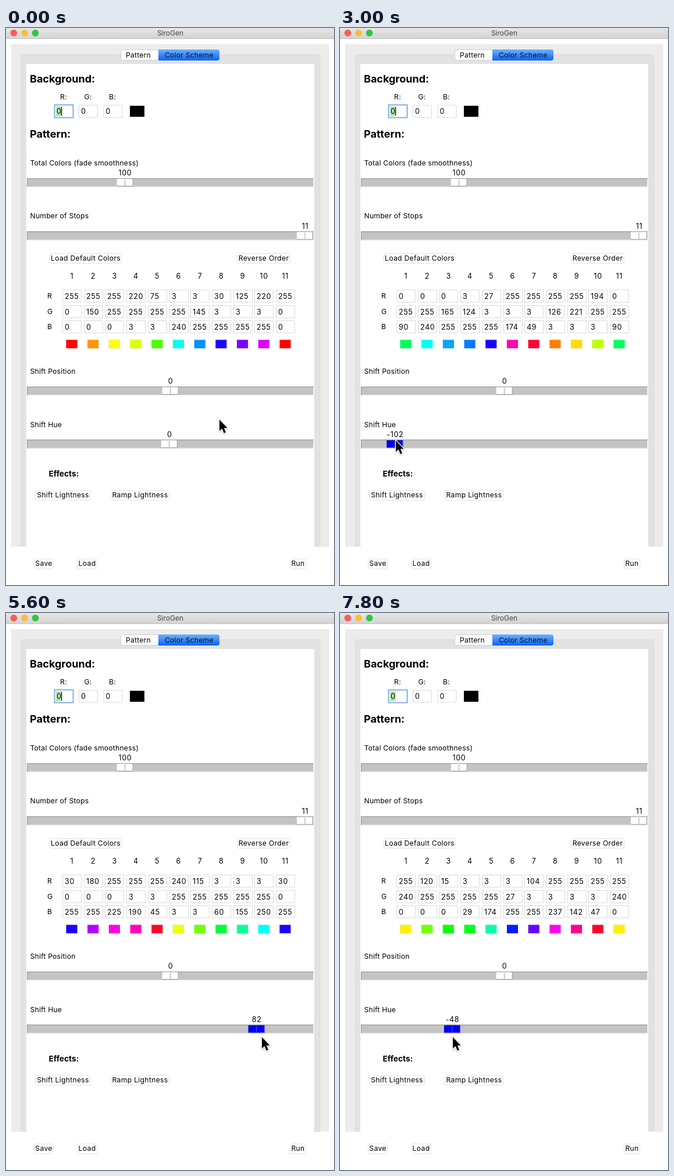
An HTML page with a canvas for the animation above (8000 ms loop, 564x960 px).

```html
<!DOCTYPE html>
<html lang="en">
<head>
<meta charset="utf-8">
<title>SiroGen</title>
<style>
  html, body { margin: 0; width: 100%; height: 100%; overflow: hidden; background: #fff; }
  canvas { display: block; width: 564px; height: 960px; }
</style>
</head>
<body>
<canvas id="stage" width="564" height="960"></canvas>
<script>
const ctx = document.getElementById('stage').getContext('2d');
const LOOP = 8000, STEP = 200, GRAB = 1000;
const FONT = 'Inter, "Open Sans", sans-serif';

// time, pointer x, pointer y, slider value, applied value, drift of the narrow-range colours
const KEYS = [
  [0, 367, 675, 0, 0, 0],
  [400, 346, 688, 0, 0, 0],
  [1000, 283, 715, 0, 0, 0],
  [1200, 273, 716, 0, 0, 0],
  [1600, 238, 714, -16, -12, 0],
  [2200, 152, 711, -70, -66, 0],
  [3000, 96, 711, -102, -100, 0],
  [3400, 90, 712, -104, -104, 2],
  [4000, 170, 716, -62, -66, 3],
  [4600, 289, 719, -6, -8, 4],
  [5600, 440, 731, 82, 80, 6],
  [6100, 470, 736, 102, 101, 6],
  [6800, 398, 739, 68, 70, 6],
  [7800, 194, 731, -48, -40, 3]
];

// Hue positions of the stops; the outer ones span 0-255, the others 3-255.
const STOPS = [0, 150, 255, 287, 432, 741, 866, 1035, 1130, 1225, 0];
const stopX = i => 113 + 36.7 * i;

const clamp = (v, lo, hi) => Math.max(lo, Math.min(hi, v));

function slope(i, c) {
  if (i === 0 || i === KEYS.length - 1) return 0;
  const [a, b, d] = [KEYS[i - 1], KEYS[i], KEYS[i + 1]];
  const m = (b[c] - a[c]) / (b[0] - a[0]), n = (d[c] - b[c]) / (d[0] - b[0]);
  return m * n > 0 ? 2 * m * n / (m + n) : 0;
}

// Monotone cubic through one column of the keys.
function track(t, c) {
  let i = 0;
  while (i < KEYS.length - 2 && t >= KEYS[i + 1][0]) i++;
  const a = KEYS[i], b = KEYS[i + 1], h = b[0] - a[0];
  const u = clamp((t - a[0]) / h, 0, 1), v = 1 - u;
  return a[c] * v * v * (1 + 2 * u) + b[c] * u * u * (3 - 2 * u)
    + h * u * v * (v * slope(i, c) - u * slope(i + 1, c));
}

function stopColor(i, shift, drift) {
  const lo = i > 2 && i < 10 ? 3 : 0, d = 255 - lo, wheel = 6 * d;
  const raw = STOPS[i] + shift + (lo ? drift : 0);
  const p = (raw % wheel + wheel) % wheel;
  return [
    Math.abs(p - 3 * d) - d,
    2 * d - Math.abs(p - 2 * d),
    2 * d - Math.abs(p - 4 * d)
  ].map(v => lo + clamp(v, 0, d));
}

function rect(x, y, w, h, fill) {
  ctx.fillStyle = fill;
  ctx.fillRect(x, y, w, h);
}

function frame(x, y, w, h, color, r = 0, fill = '#fff', line = 1) {
  ctx.beginPath();
  ctx.roundRect(x + .5, y + .5, w - 1, h - 1, r);
  ctx.fillStyle = fill;
  ctx.fill();
  ctx.strokeStyle = color;
  ctx.lineWidth = line;
  ctx.stroke();
}

function text(s, x, y, { size = 12.2, weight = 400, align = 'left', gap = .2, color = '#000' } = {}) {
  ctx.font = `${weight} ${size}px ${FONT}`;
  ctx.letterSpacing = gap + 'px';
  ctx.textAlign = align;
  ctx.fillStyle = color;
  ctx.fillText(s, x, y);
}

const number = (s, x, y, align = 'center') => text(s, x, y, { size: 12.6, gap: .6, align });
const heading = (s, x, y, size = 18) => text(s, x, y, { size, weight: 700, gap: 0 });

function button(s, x, y, w) {
  frame(x, y + 1, w, 18, '#e2e2e2', 3);
  text(s, x + w / 2, y + 13.5, { align: 'center', gap: .3 });
}

function field(s, x, y) {
  frame(x, y, 33, 22, '#d9d9d9');
  number(s, x + 4, y + 15.7, 'left');
}

function slider(y, x, value, active) {
  rect(36, y, 493, 15, '#c3c3c3');
  rect(36, y, 493, 1, '#929292');
  rect(36, y, 1, 15, '#929292');
  rect(37, y + 14, 492, 1, '#e4e4e4');
  rect(528, y + 1, 1, 14, '#e4e4e4');
  const l = x - 14;
  rect(l, y + 1, 28, 13, active ? '#0000a8' : '#8e8e8e');
  rect(l + 1, y + 2, 26, 11, active ? '#0000f2' : '#fff');
  if (!active) rect(l, y + 1, 27, 12, '#fff');
  rect(x - .5, y + 2, 1, 11, active ? '#5555ff' : '#a0a0a0');
  if (active) {
    rect(l + 1, y + 13, 27, 1, '#5050ff');
    rect(l + 27, y + 2, 1, 12, '#5050ff');
  }
  number(value, x + .5, y - 4.7);
}

function windowChrome() {
  rect(0, 0, 564, 960, '#fff');
  const bar = ctx.createLinearGradient(0, 0, 0, 18);
  bar.addColorStop(0, '#e6e6e6');
  bar.addColorStop(1, '#d3d3d3');
  rect(0, 0, 564, 18, bar);
  rect(0, 18, 564, 1, '#c4c4c4');
  ['#fc5b55', '#fdbc37', '#2fc641'].forEach((color, i) => {
    ctx.beginPath();
    ctx.arc(13.3 + 18.6 * i, 8.6, 5.8, 0, 7);
    ctx.fillStyle = color;
    ctx.fill();
  });
  text('SiroGen', 282.5, 13.2, { size: 12, gap: 0, align: 'center', color: '#444' });

  rect(9, 28, 547, 866, '#ececec');
  ctx.beginPath();
  ctx.roundRect(26, 46, 514, 848, [4, 4, 0, 0]);
  ctx.fillStyle = '#e2e2e2';
  ctx.fill();
  ctx.strokeStyle = '#dadada';
  ctx.lineWidth = 1;
  ctx.stroke();
  rect(35, 62, 495, 832, '#fff');
  rect(0, 894, 564, 66, '#fff');
}

function tabs() {
  frame(197, 37, 70, 19, '#cfcfcf', 4);
  const blue = ctx.createLinearGradient(0, 37, 0, 56);
  blue.addColorStop(0, '#6eb2fa');
  blue.addColorStop(1, '#0a63f4');
  ctx.beginPath();
  ctx.roundRect(262, 37, 105, 19, [0, 4, 4, 0]);
  ctx.fillStyle = blue;
  ctx.fill();
  text('Pattern', 206, 51.2);
  text('Color Scheme', 273, 51.2, { color: '#041030' });
}

function background(t) {
  heading('Background:', 41, 94.3);
  ['R:', 'G:', 'B:'].forEach((s, i) => text(s, 99 + 42 * i, 122.7, { align: 'center' }));
  field('0', 125, 132.5);
  field('0', 167.5, 132.5);
  frame(83, 132, 33, 23, '#7fb0e6', 0, '#fff', 2);
  rect(86, 135, 10, 17, '#b9e5a5');
  number('0', 87, 148.2, 'left');
  const blink = t % 900;
  if (blink < 400 || blink >= 700) rect(95, 136, 1.2, 15, '#000');
  rect(213, 134, 25, 19, '#000');
}

function colorTable(shift, drift) {
  ['R', 'G', 'B'].forEach((s, i) => text(s, 71, 466.3 + 26.4 * i));
  STOPS.forEach((_, i) => {
    const x = stopX(i), rgb = stopColor(i, shift, drift);
    number(i + 1, x + .3, 432.2);
    rgb.forEach((v, row) => field(v, Math.round(x - 16), Math.round(451 + 26.5 * row)));
    rect(x - 10.5, 536.5, 21, 16.5, '#f0f0f0');
    rect(x - 9.5, 537.5, 19, 14.5, `rgb(${rgb})`);
  });
}

function pointer(x, y) {
  ctx.save();
  ctx.translate(x, y);
  ctx.beginPath();
  ctx.moveTo(0, 0);
  [[0, 19.5], [4.6, 15.6], [7.8, 23.2], [11, 21.8], [7.9, 14.4], [13.6, 14.2]]
    .forEach(p => ctx.lineTo(...p));
  ctx.closePath();
  ctx.shadowColor = 'rgba(0,0,0,.3)';
  ctx.shadowBlur = 3;
  ctx.shadowOffsetY = 1;
  ctx.strokeStyle = '#fff';
  ctx.lineWidth = 2.4;
  ctx.stroke();
  ctx.shadowColor = 'transparent';
  ctx.fillStyle = '#000';
  ctx.fill();
  ctx.restore();
}

function draw(t) {
  const value = Math.round(track(t, 3));
  const shift = -6 * Math.round(track(t, 4));
  windowChrome();
  tabs();
  background(t);

  heading('Pattern:', 41, 188.5);
  text('Total Colors (fade smoothness)', 41.5, 236.7);
  slider(259, 204.5, 100);
  text('Number of Stops', 41.5, 328.2);
  slider(350.5, 514, 11);
  button('Load Default Colors', 75, 387, 124);
  button('Reverse Order', 397, 387, 92);
  colorTable(shift, Math.round(track(t, 5)));
  text('Shift Position', 41.5, 596.2);
  slider(618, 282.5, 0);
  text('Shift Hue', 41.5, 687.6);
  slider(709.5, 280.7 + 1.828 * value, value, t >= GRAB);

  heading('Effects:', 73.5, 772.5, 13.7);
  button('Shift Lightness', 50, 795.5, 96);
  button('Ramp Lightness', 180, 795.5, 101);
  button('Save', 48, 913.5, 34);
  button('Load', 122, 913.5, 35);
  button('Run', 488, 913.5, 28);
  pointer(track(t, 1), track(t, 2));
}

const start = performance.now();
function tick() {
  const t = (performance.now() - start) % LOOP;
  draw(Math.floor(t / STEP) * STEP);
  requestAnimationFrame(tick);
}
tick();
</script>
</body>
</html>
```
